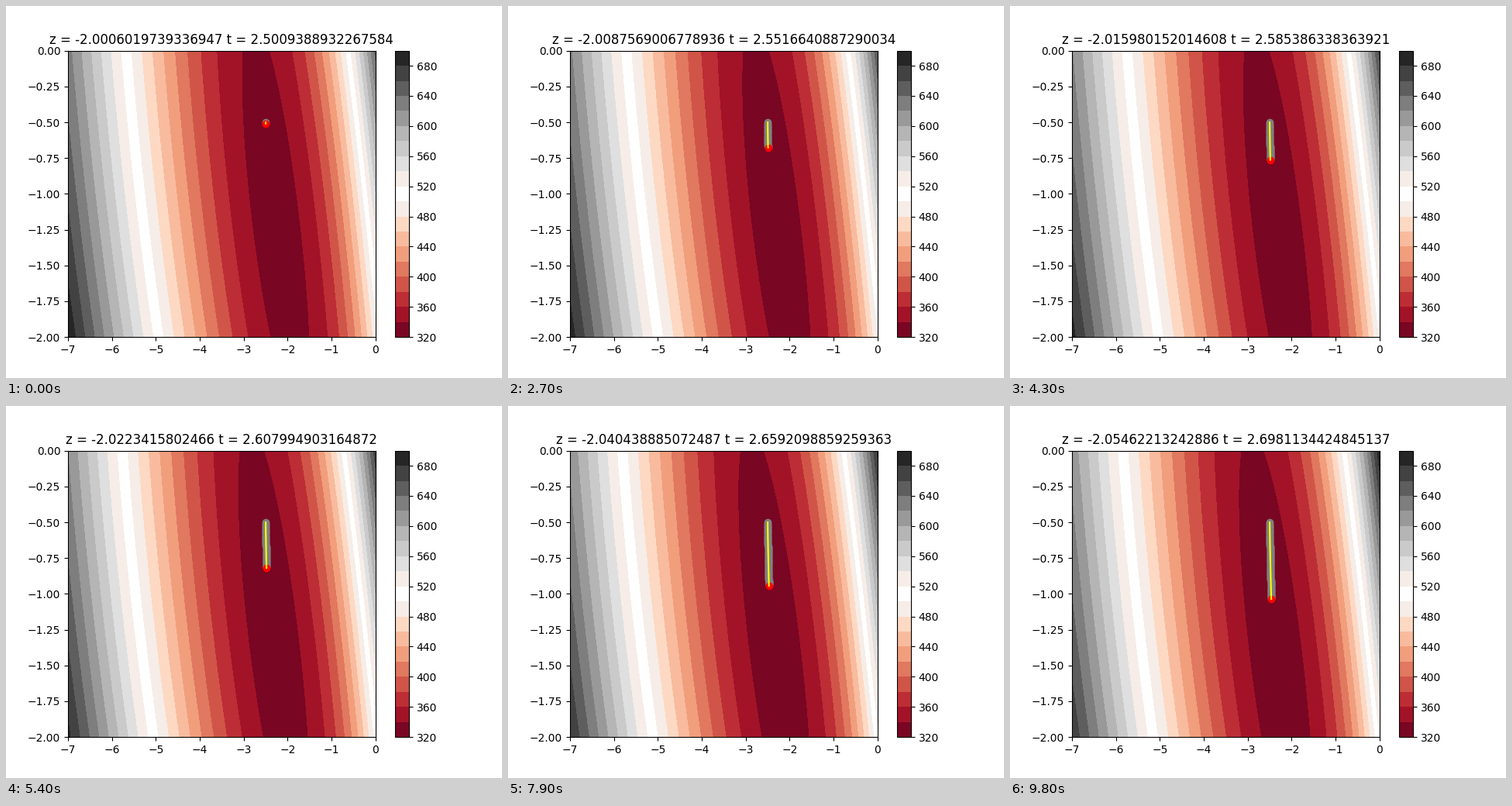
Animation, 640 px wide and 480 px high, one loop 9900 ms. Source, as a matplotlib script:

```python
import numpy as np
import matplotlib.pyplot as plt
from matplotlib.animation import FuncAnimation
from matplotlib.colors import ListedColormap

FRAMES = 99
LEVELS = np.arange(320, 701, 20)

# Key points of the two counters in the title
STEPS = np.array([0, 15, 43, 98])
Z = np.array([-2.0006019739336947, -2.004512502495336,
              -2.015980152014608, -2.05462213242886])
T = np.array([2.5009388932267584, 2.5276190001242256,
              2.585386338363921, 2.6981134424845137])


def ease(values, step):
    """Cubic Hermite interpolation between the key points."""
    slopes = np.gradient(values, STEPS)
    i = min(np.searchsorted(STEPS, step, side="right") - 1, len(STEPS) - 2)
    h = STEPS[i + 1] - STEPS[i]
    u = (step - STEPS[i]) / h
    blend = u * u * (3 - 2 * u)
    return float(values[i] * (1 - blend) + values[i + 1] * blend
                 + h * slopes[i] * u * (1 - u) ** 2
                 - h * slopes[i + 1] * u * u * (1 - u))


def loss(x, y, t):
    """Slanted valley: nearly linear left wall, steeper cubic right wall."""
    dt = t - 2.5
    u = x - (-2.714 - 0.388 * y - 0.882 * dt)
    floor = 337 + 4.5 * dt + (10.95 + 11.75 * dt) * y + 4.65 * y ** 2
    left = 98 * (np.sqrt(u ** 2 + 1.618 ** 2) - 1.618)
    right = 30.3 * u ** 2 + (4.3 - 0.75 * y) * u ** 3
    return np.minimum(floor + np.where(u < 0, left, right), 699)


bands = plt.get_cmap("RdGy")((np.arange(19) + 0.5) / 19)
bands[[8, 10], :3] = np.array([246, 237, 232]) / 255
cmap = ListedColormap(bands)

# The descent slows along y and drifts slightly to the right
n = np.arange(FRAMES + 1)
path_x = -2.5 + 0.000162 * n ** 1.18
path_y = -0.5 - 0.0094 * n ** 0.88

X, Y = np.meshgrid(np.linspace(-7, 0, 120), np.linspace(-2, 0, 80))

fig, ax = plt.subplots(figsize=(6.4, 4.8), dpi=100)


def draw_field(t):
    return ax.contourf(X, Y, loss(X, Y, t), levels=LEVELS, cmap=cmap)


field = draw_field(T[0])
fig.colorbar(field, ax=ax)
visited, = ax.plot([], [], "o", color="gray")
current, = ax.plot([], [], "o", color="red")
line, = ax.plot([], [], color="yellow")
ax.set_xlim(-7, 0)
ax.set_ylim(-2, 0)


def update(k):
    global field
    z, t = ease(Z, k), ease(T, k)
    field.remove()
    field = draw_field(t)
    visited.set_data(path_x[:k + 1], path_y[:k + 1])
    current.set_data(path_x[k + 1:k + 2], path_y[k + 1:k + 2])
    line.set_data(path_x[:k + 2], path_y[:k + 2])
    ax.set_title(f"z = {z} t = {t}")


anim = FuncAnimation(fig, update, frames=FRAMES, interval=100, repeat=True,
                     repeat_delay=0, blit=False)
plt.show()
```
